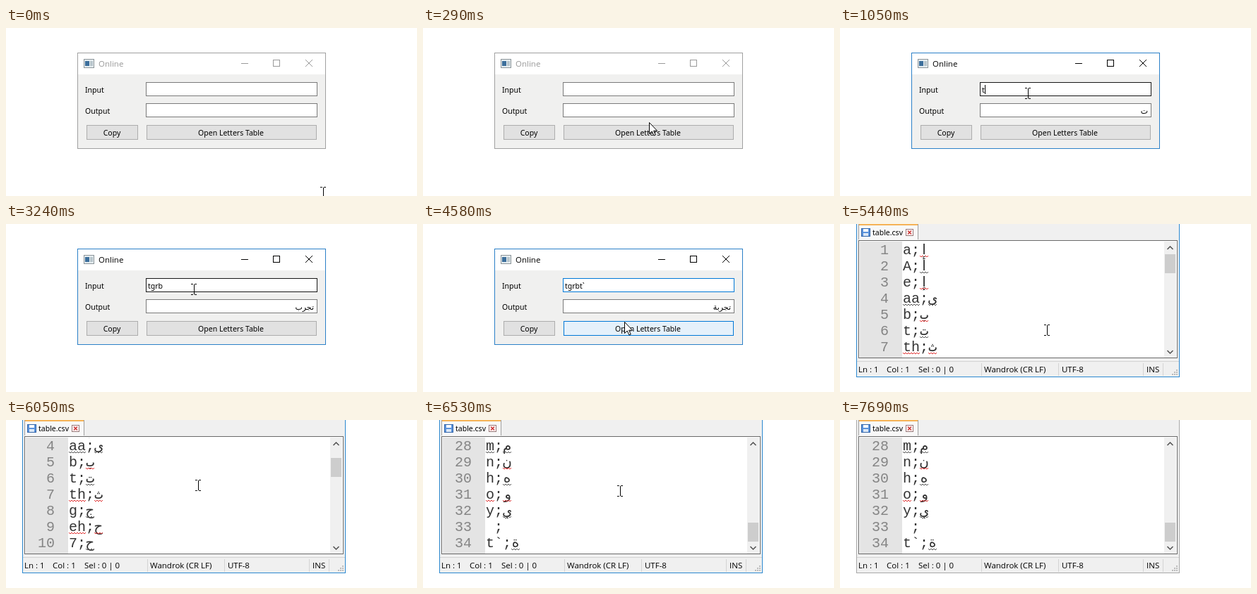
An HTML page for the animation above (7770 ms loop, 582 by 239 pixels).

```html
<!DOCTYPE html>
<html lang="en">
<head>
<meta charset="utf-8">
<title>Letter converter</title>
<style>
html, body { margin: 0; width: 100%; height: 100%; overflow: hidden; background: #fff; }
svg { display: block; }
rect, .crisp { shape-rendering: crispEdges; }
text { white-space: pre; fill: #000; }
.ui { font: 10.5px "Noto Sans", sans-serif; }
.bar { font: 11.5px "Open Sans", sans-serif; }
.code { font: 20px "Liberation Mono", "DejaVu Sans Mono", monospace; fill: #333; }
.num { fill: #858585; text-anchor: end; }
.arabic { font: 11px "DejaVu Sans", sans-serif; direction: rtl; }
.mid { text-anchor: middle; }
.line { fill: none; }
.field { fill: #fff; stroke: #7a7a7a; }
.btn { fill: #e1e1e1; stroke: #adadad; }
.field.focus { stroke: #0078d7; }
.field.hover { stroke: #171717; }
.btn.hover { fill: #e5f1fb; stroke: #0078d7; }
.btn.down { fill: #cce4f7; stroke: #005499; }
#dialog { --edge: #a0a0a0; --ink: #999; }
#dialog.active { --edge: #2b80c8; --ink: #000; }
#frame { fill: #f0f0ef; stroke: var(--edge); }
#title { fill: var(--ink); }
#controls { stroke: var(--ink); }
#edge { stroke: #a8a8a8; }
#editor.active #edge { stroke: #2b88d0; }
</style>
</head>
<body>
<svg width="582" height="239" viewBox="0 0 582 239">
  <defs>
    <clipPath id="view"><rect x="28" y="25" width="431" height="164"/></clipPath>
  </defs>

  <g id="dialog">
    <rect id="frame" x="101.5" y="35.5" width="351" height="136"/>
    <rect x="102" y="36" width="350" height="30" fill="#fff"/>
    <rect x="110.5" y="44.5" width="14" height="12" fill="#e6edf0" stroke="#8b9499"/>
    <rect x="112" y="47" width="6" height="7" fill="#3c6f9c"/>
    <rect x="119" y="47" width="4" height="7" fill="#b9c6cd"/>
    <text id="title" class="bar" x="131" y="55">Online</text>
    <g id="controls" class="line">
      <path class="crisp" d="M333 50.5h10M378.5 45.5h9v9h-9z"/>
      <path d="M424 45l10 10M434 45l-10 10"/>
    </g>
    <text class="ui" x="112" y="92">Input</text>
    <text class="ui" x="112" y="122">Output</text>
    <rect id="input" class="field" x="198.5" y="77.5" width="242" height="19"/>
    <rect id="output" class="field" x="198.5" y="107.5" width="242" height="19"/>
    <text id="typed" class="ui" x="201" y="92"></text>
    <text id="result" class="arabic" x="436" y="122"></text>
    <rect id="caret" y="81" width="1" height="13"/>
    <rect id="copy" class="btn" x="114.5" y="138.5" width="72" height="20"/>
    <rect id="open" class="btn" x="199.5" y="138.5" width="240" height="20"/>
    <text class="ui mid" x="150" y="153">Copy</text>
    <text class="ui mid" x="318.5" y="153">Open Letters Table</text>
  </g>

  <g id="editor">
    <rect x="23" y="0" width="458" height="218" fill="#f0f0f0"/>
    <rect x="26" y="0" width="84" height="23" fill="#f8f8f8"/>
    <rect x="26" y="0" width="84" height="2" fill="#f5b45a"/>
    <path class="line crisp" stroke="#a0a0a0" d="M26.5 0v22M110.5 0v22"/>
    <rect x="30.5" y="6.5" width="12" height="11" fill="#5b93dc" stroke="#3465a8"/>
    <rect x="33" y="7" width="7" height="4" fill="#fff"/>
    <rect x="33" y="13" width="7" height="4" fill="#dce8f6"/>
    <text class="ui" x="46" y="16">table.csv</text>
    <rect x="93.5" y="7.5" width="10" height="9" fill="#fff" stroke="#977"/>
    <path stroke="#c33" stroke-width="1.5" d="M96 9.5l5 5M101 9.5l-5 5"/>
    <rect x="26.5" y="23.5" width="451" height="167" fill="#fff" stroke="#696969"/>
    <rect x="28" y="25" width="60" height="165" fill="#e4e4e4"/>
    <g clip-path="url(#view)"><g id="rows"></g></g>
    <rect x="459" y="25" width="17" height="165" fill="#f0f0f0"/>
    <rect id="thumb" x="460" width="15" height="27" fill="#cdcdcd"/>
    <path class="line" stroke="#505050" stroke-width="1.5" d="M463.500 36l4-4 4 4M463.500 180l4 4 4-4"/>
    <path class="line crisp" stroke="#d4d4d4" d="M24 195.500h456M200.500 198v18M309.500 198v18M429.500 198v18M457.500 198v18"/>
    <g id="status" class="bar">
      <text x="26" y="211">Ln : 1</text>
      <text x="66" y="211">Col : 1</text>
      <text x="111" y="211">Sel : 0 | 0</text>
      <text x="204" y="211">Wandrok (CR LF)</text>
      <text x="314" y="211">UTF-8</text>
      <text x="434" y="211">INS</text>
    </g>
    <path class="line crisp" stroke="#bbb" stroke-width="2" stroke-dasharray="2 1" d="M470 214h8M473 211h5M476 208h2"/>
    <path id="edge" class="line crisp" d="M23.500 0v217.500h457V0"/>
  </g>

  <g id="cursor">
    <path id="beam" class="line crisp" stroke="#000" d="M-4 -6.500h3M1 -6.500h3M.5 -6v14M-4 8.500h3M1 8.500h3"/>
    <path id="arrow" fill="#fff" stroke="#000" d="M.5 .5v16l3.700-3.500 2.800 6 2.300-1-2.700-5.800h5z"/>
    <path id="resize" fill="#fff" stroke="#000" d="M-6.500 -6.500h6l-2 2 7 7 2-2v6h-6l2-2-7-7-2 2z"/>
  </g>
</svg>

<script>
const LOOP = 7770, ROW = 23, CELL = 12;
const $ = id => document.getElementById(id);
const [dialog, editor, rows, thumb, caret, cursor, typed, result] =
  ["dialog", "editor", "rows", "thumb", "caret", "cursor", "typed", "result"].map($);

const letters = ("a;ا A;أ e;إ aa;ى b;ب t;ت th;ث g;ج eh;ح 7;ح kh;خ d;د dh;ذ r;ر z;ز s;س sh;ش " +
  "S;ص D;ض T;ط Z;ظ 3;ع gh;غ f;ف q;ق k;ك l;ل m;م n;ن h;ه o;و y;ي _; t`;ة").split(" ");

function add(tag, attrs, text = "") {
  const el = document.createElementNS("http://www.w3.org/2000/svg", tag);
  for (const name in attrs) el.setAttribute(name, attrs[name]);
  el.textContent = text;
  rows.append(el);
}

function squiggle(x, y, width, stroke) {
  add("path", { class: "line", stroke, d: `M${x} ${y}` + "l2 2l2 -2".repeat(Math.round(width / 4)) });
}

letters.forEach((entry, i) => {
  const [key, letter] = entry.split(";");
  const y = 43 + i * ROW, x = 89 + CELL * key.length;
  const color = i % 2 ? "#555" : "#e03030";
  add("text", { class: "code num", x: 69, y }, i + 1);
  if (key !== "_") add("text", { class: "code", x: 89, y }, key);
  add("text", { class: "code", x, y }, ";");
  add("text", { class: "code", x: x + CELL, y }, letter);
  if (/^([a-z]{2}|[mo])$/.test(key)) squiggle(89, y + 2, x - 89, color);
  if (letter) squiggle(x + CELL, y + 2, CELL, color);
});

const linear = p => p, easeOut = p => 1 - (1 - p) ** 3, dip = p => p ** 1.6;

// Pointer moves: start, end, steps, x, y, easing of x, easing of y
const moves = [
  [70, 670, 9, 266, 92, easeOut, easeOut],
  [4260, 4261, 1, 266, 93],
  [4410, 4580, 3, 285, 139],
  [4650, 4800, 3, 291, 150],
  [5200, 5201, 1, 293, 150],
  [5670, 6050, 6, 272, 92],
  [6300, 6530, 3, 279, 100],
  [6680, 7370, 10, 505, 250, linear, dip]
];

// Typing: time, length, caret x (0 hides it)
const typing = [
  [0, 0, 0], [300, 0, 201], [830, 0, 0], [1050, 1, 205], [1680, 1, 0],
  [1830, 2, 210], [2230, 3, 214], [2610, 4, 221], [3240, 4, 0],
  [3310, 5, 225], [3560, 6, 231], [4170, 6, 0]
];

// Scrolling: time, top line
const scroll = [[0, 1], [6050, 4], [6140, 7], [6220, 13], [6300, 16], [6450, 22], [6530, 28]];

const last = (list, t) => list.filter(item => item[0] <= t).pop();
const show = (el, on) => { el.style.display = on ? "" : "none"; };
const within = (t, from, to) => t >= from && t < to;

function pointer(t) {
  let x = 449, y = 233;
  for (const [from, to, steps, tx, ty, ex = linear, ey = linear] of moves) {
    if (t < from) break;
    const step = Math.floor((t - from) / (to - from) * (steps - 1) + 1e-6) + 1;
    const p = Math.min(1, step / steps);
    x += (tx - x) * ex(p);
    y += (ty - y) * ey(p);
  }
  return [Math.round(x), Math.round(y)];
}

function over(el, x, y) {
  const b = el.getBBox();
  return x >= b.x && x <= b.x + b.width && y >= b.y && y <= b.y + b.height;
}

function shape(x, y, editing) {
  if (!editing) {
    const fields = over($("input"), x, y) || over($("output"), x, y);
    return over($("frame"), x, y) && !fields ? "arrow" : "beam";
  }
  if (within(x, 470, 484) && within(y, 208, 228)) return "resize";
  const inText = x < 459 && within(y, 25, 190);
  return x < 481 && y < 218 && !inText ? "arrow" : "beam";
}

function draw(t) {
  const editing = t >= 5200;
  const [x, y] = pointer(t);
  show(dialog, !editing);
  show(editor, editing);

  if (editing) {
    const top = last(scroll, t)[1];
    rows.setAttribute("transform", `translate(0 ${(1 - top) * ROW})`);
    thumb.setAttribute("y", Math.round(43 + (top - 1) * 3.8));
    show(rows, t >= 5350);
    editor.classList.toggle("active", within(t, 5440, 7690));
  } else {
    const [, count, caretX] = last(typing, t);
    typed.textContent = "tgrbt`".slice(0, count);
    result.textContent = count > 5 ? "تجربة" : "تجربت".slice(0, count);
    caret.setAttribute("x", caretX);
    show(caret, caretX);
    dialog.classList.toggle("active", within(t, 300, 5050));
    $("input").classList.toggle("focus", within(t, 300, 4800));
    $("open").classList.toggle("down", within(t, 4800, 4880));
    for (const id of ["input", "output", "copy", "open"])
      $(id).classList.toggle("hover", over($(id), x, y));
  }

  const kind = shape(x, y, editing);
  for (const id of ["beam", "arrow", "resize"]) show($(id), id === kind);
  cursor.setAttribute("transform", `translate(${x} ${y})`);
}

const start = performance.now();
function tick() {
  draw((performance.now() - start) % LOOP);
  requestAnimationFrame(tick);
}
tick();
</script>
</body>
</html>
```
